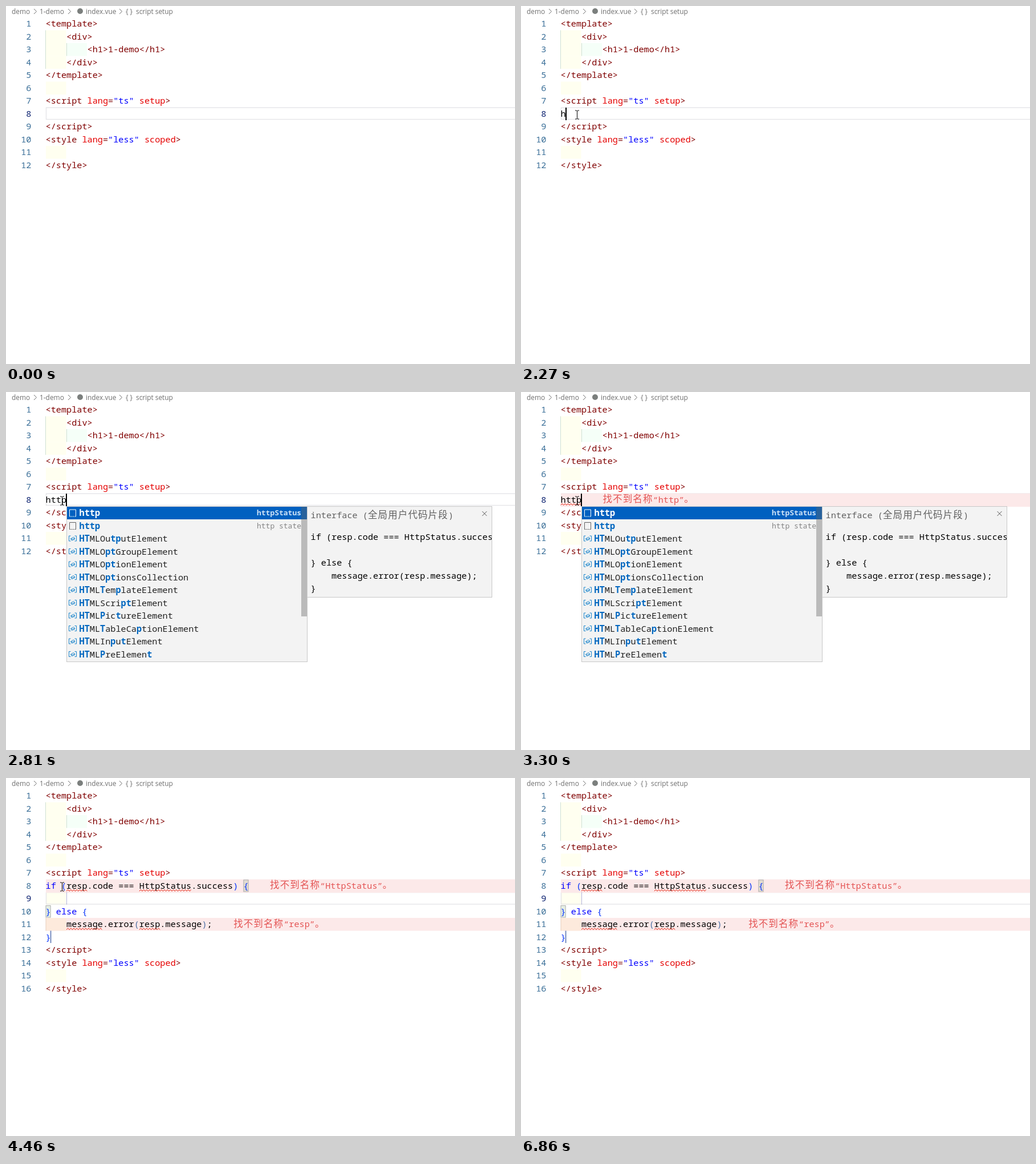
These frames come from a looping animation (893 by 627 pixels, 6.91 s). An HTML page with a canvas:

```html
<!DOCTYPE html>
<html lang="en">
<head>
<meta charset="utf-8">
<title>Snippet completion</title>
<style>
  html, body { margin: 0; width: 100%; height: 100%; overflow: hidden; background: #fff; }
  canvas { display: block; }
</style>
</head>
<body>
<canvas width="893" height="627"></canvas>
<script>
const ctx = document.querySelector('canvas').getContext('2d');
const LOOP = 6910, LEFT = 69.5, CHAR = 9.13, ROW = 22.5, WIDTH = 893;
const MONO = '"Noto Sans Mono", monospace';
const CODE = `15.22px ${MONO}`;
const YELLOW = '#fffff0', PINK = '#fce9e9', GUIDE = '#cfe0d3', TABSTOP = 'rgba(10,50,140,.55)';
const KEYS = [2270, 2410, 2600, 2750];
const LIST_OPEN = 2460, FIRST_ERROR = 3170, INSERT = 3690, COLORED = 4000, ERRORS = 4310;
const GHOST = [4720, 6860];

const MARKUP = /(".*?")|(<\/?\w+|>|=|1-demo)|(\b(?:lang|setup|scoped)\b)/g;
const SCRIPT = /(\b(?:if|else)\b)|([(){}])|([^\s(){}]+)/g;
const above = ['<template>', '    <div>', '        <h1>1-demo</h1>', '    </div>', '</template>', '',
  '<script lang="ts" setup>'];
const below = ['<\/script>', '<style lang="less" scoped>', '', '</style>'];
const snippet = ['if (resp.code === HttpStatus.success) {', '', '} else {', '    message.error(resp.message);', '}'];
// Asterisks switch the bold match highlight on and off.
const lists = {
  2: ['*ht*tp', '*ht*tp', ...['AllCollection', 'AnchorElement', 'AreaElement', 'AudioElement', 'BRElement', 'BaseElement',
    'BodyElement', 'ButtonElement', 'CanvasElement', 'Collection'].map(s => '*HT*ML' + s)],
  4: ['*http*', '*http*', ...['Ou*tp*utElement', 'O*pt*GroupElement', 'O*pt*ionElement', 'O*pt*ionsCollection',
    '*T*em*p*lateElement', 'Scri*pt*Element', '*P*ic*t*ureElement', '*T*ableCa*p*tionElement', 'In*p*u*t*Element',
    '*P*reElemen*t*'].map(s => '*HT*ML' + s)]
};
// Pointer path: time, x, y.
const path = [[90, 752, 574], [270, 420, 260], [400, 110, 37], [500, 58, 90], [630, 95, 181], [820, 95, 181],
  [1130, 98, 191], [1450, 98, 191], [1460, 104, 194], [1540, 98, 190], [5870, 98, 190], [6220, 708, 632]];

const colX = col => LEFT + col * CHAR;

function box(x, y, w, h, color) {
  ctx.fillStyle = color;
  ctx.fillRect(x, y, w, h);
}

function outline(x, y, w, h, color, width = 1) {
  ctx.strokeStyle = color;
  ctx.lineWidth = width;
  ctx.strokeRect(x, y, w, h);
}

function line(points, color, width = 1) {
  ctx.strokeStyle = color;
  ctx.lineWidth = width;
  ctx.beginPath();
  points.forEach(([x, y]) => ctx.lineTo(x, y));
  ctx.stroke();
}

function text(str, x, y, color = '#000', font = CODE, align = 'left') {
  ctx.font = font;
  ctx.fillStyle = color;
  ctx.textAlign = align;
  ctx.fillText(str, x, y);
}

function chinese(str, x, y, color) {
  ctx.letterSpacing = '1.1px';
  text(str, x, y, color, '300 16.5px "Noto Sans CJK SC", "Noto Sans CJK", sans-serif');
  ctx.letterSpacing = '0px';
}

function tokens(str, y, pattern, colors) {
  for (const m of str.matchAll(pattern)) {
    const group = m.slice(1).findIndex(g => g !== undefined);
    text(m[0], colX(m.index), y, colors[group]);
  }
}

function squiggle(col, length, y) {
  const points = [];
  for (let x = 0; x <= length * CHAR; x += 2.6) points.push([colX(col) + x, y + (points.length % 2 ? 18.2 : 20.6)]);
  line(points, '#e51400');
}

function message(col, name, y) {
  const x = colX(col) + 37.5, red = '#e45454';
  chinese('找不到名称', x, y + 15.5, red);
  text(`“${name}”`, x + 88, y + 16, red);
  chinese('。', x + 88 + (name.length + 2) * CHAR, y + 15.5, red);
}

function breadcrumb() {
  const gray = '#6f6f6f', font = '11.9px "Open Sans", sans-serif';
  [['demo', 10], ['1-demo', 59], ['index.vue', 140], ['script setup', 228]].forEach(([s, x]) => text(s, x, 14, gray, font));
  text('{ }', 210, 13.5, gray, font);
  [49, 109, 199].forEach(x => line([[x, 5], [x + 4.5, 9.5], [x, 14]], gray));
  ctx.fillStyle = '#7b7f7d';
  ctx.beginPath();
  ctx.arc(130, 9, 5, 0, 7);
  ctx.fill();
}

function listIcon(x, y, row) {
  if (row < 2) {
    const color = row ? '#616161' : '#fff';
    line([[x + 1, y + 6], [x + 1, y - 6], [x + 12, y - 6], [x + 12, y + 6]], color);
    ctx.setLineDash([2, 1]);
    line([[x + 1, y + 6], [x + 12, y + 6]], color);
    ctx.setLineDash([]);
    return;
  }
  const blue = '#1a85cc';
  line([[x + 3, y - 5], [x, y - 5], [x, y + 4], [x + 3, y + 4]], blue);
  line([[x + 10, y - 5], [x + 13, y - 5], [x + 13, y + 4], [x + 10, y + 4]], blue);
  line([[x + 3, y], [x + 8, y - 3], [x + 10, y - 1], [x + 10, y + 1], [x + 5, y + 3], [x + 3, y], [x + 6, y + 1], [x + 10, y - 1]], blue);
}

function completion(col) {
  const x = Math.round(colX(col)) + .5, y = 200.5;
  box(x, y, 422, 272, '#f3f3f3');
  box(x, y, 422, ROW, '#0060c0');
  lists[col > 2 ? 4 : 2].forEach((item, row) => {
    const middle = 212 + row * ROW;
    listIcon(x + 4, middle, row);
    let tx = x + 22;
    item.split('*').forEach((part, i) => {
      const bold = i % 2, color = !row ? '#fff' : bold ? '#0066bf' : '#222';
      text(part, tx, middle + 5.3, color, (bold ? 'bold ' : '') + CODE);
      tx += part.length * CHAR;
    });
  });
  text('httpStatus', x + 411.5, 216, '#cfe3f7', `bold 13px ${MONO}`, 'right');
  text('http state', x + 411.5, 238.5, '#858585', `13px ${MONO}`, 'right');
  box(x + 411.5, 201, 10, col > 2 ? 192 : 39, 'rgba(100,100,100,.4)');
  outline(x, y, 422, 272, '#c8c8c8');
  details(x + 422, y, col);
}

function details(x, y, col) {
  ctx.save();
  ctx.beginPath();
  ctx.rect(x, y - 1, 325, 161);
  ctx.clip();
  box(x, y, 324, 159, '#f3f3f3');
  text('interface (', x + 6, 220.5, '#616161');
  chinese('全局用户代码片段', x + 106.5, 220.5, '#616161');
  text(')', x + 247.5, 220.5, '#616161');
  snippet.forEach((s, i) => text(s, x + 6, 259.3 + i * ROW));
  if (col === 2) box(x, 349, 280, 10, 'rgba(100,100,100,.13)');
  line([[x + 307, 209], [x + 315, 217]], '#555');
  line([[x + 315, 209], [x + 307, 217]], '#555');
  outline(x, y, 324, 159, '#c8c8c8');
  ctx.restore();
}

function pointer(t) {
  if (t < path[0][0] || t >= path.at(-1)[0]) return;
  const i = path.findIndex(p => p[0] > t);
  const [t0, x0, y0] = path[i - 1], [t1, x1, y1] = path[i];
  const k = (t - t0) / (t1 - t0);
  const x = Math.round(x0 + (x1 - x0) * k) + .5, y = Math.round(y0 + (y1 - y0) * k) + .5;
  line([[x, y - 6.5], [x, y + 6.5]], '#000');
  [-1, 1].forEach(s => line([[x - 3.5, y + s * 7.5], [x - 1, y + s * 7.5], [x, y + s * 6.5],
    [x + 1, y + s * 7.5], [x + 3.5, y + s * 7.5]], '#000'));
}

function draw(t) {
  const typed = KEYS.filter(k => t >= k).length;
  const inserted = t >= INSERT, colored = t >= COLORED, errors = t >= ERRORS;
  const ghost = t >= GHOST[0] && t < GHOST[1];
  const body = inserted ? snippet : ['http'.slice(0, typed)];
  const lines = [...above, ...body, ...below];
  const active = inserted ? 9 : 8;
  const top = n => 20 + ROW * (n - 1 + (ghost && n > 9));
  const indent = (n, color = YELLOW) => box(70, top(n), 35.5, ROW, color);

  box(0, 0, WIDTH, 627, '#fff');
  breadcrumb();

  [2, 3, 4, 6, lines.length - 1].forEach(n => indent(n));
  box(106, top(3), 36, ROW, '#f5fff8');
  box(69, top(2), 1, ROW * 3, GUIDE);
  box(106, top(3), 1, ROW, GUIDE);
  if (colored) box(70, top(9), ghost ? 311 : 35.5, ROW, ghost ? '#fffff7' : YELLOW);
  outline(70.5, top(active) + .5, WIDTH, ROW - 2, '#e5e5e8', 1.4);
  if (t >= FIRST_ERROR) box(70, top(8), WIDTH, ROW + 1, PINK);
  if (errors) {
    box(70, top(11), WIDTH, ROW, PINK);
    indent(11, '#fdeadc');
  } else if (colored) indent(11);
  if (inserted) box(69.5, top(11), 1, ROW, errors ? '#e8cdbb' : '#d3d3d3');
  if (colored) {
    [[38, 8], [0, 10]].forEach(([col, n]) => {
      box(colX(col), top(n) + 1, CHAR, ROW - 2, 'rgba(0,100,0,.1)');
      outline(colX(col) + .5, top(n) + 1, CHAR - 1, ROW - 2, '#b0b0b0');
    });
  }

  lines.forEach((str, i) => {
    const n = i + 1, y = top(n) + 16.2;
    text(n, 44.5, y, n === active ? '#0b216f' : '#3a6f98', CODE, 'right');
    if (i >= 7 && i < 7 + body.length) {
      const bracket = n === 11 ? '#4a6fa5' : '#0431fa';
      tokens(str, y, SCRIPT, colored ? ['#0000ff', bracket, '#000'] : ['#000', '#000', '#000']);
    } else {
      const string = inserted && !colored && n > 12 ? '#0451a5' : '#0000ff';
      tokens(str, y, MARKUP, [string, '#800000', '#e50000']);
    }
  });

  if (errors) {
    squiggle(4, 4, top(8));
    squiggle(18, 10, top(8));
    squiggle(4, 7, top(11));
    squiggle(18, 4, top(11));
    message(39, 'HttpStatus', top(8));
    message(32, 'resp', top(11));
  } else if (t >= FIRST_ERROR) {
    squiggle(0, 4, top(8));
    message(inserted ? 39 : 4, 'http', top(8));
  }
  if (ghost) {
    text('message.success(resp.message);', colX(4), top(9) + 16.2, '#8c8c8c', 'italic ' + CODE);
    text("this.$router.push({ path: '/login' });", colX(4), top(9) + ROW + 16.2, '#8c8c8c', 'italic ' + CODE);
  }
  if (inserted) {
    box(ghost ? 381 : 106, top(9), 1, ROW - 1, 'rgba(10,10,140,.3)');
    box(77.5, top(12), 2, ROW - 1, TABSTOP);
  }

  const blinkOn = inserted ? (t < 4400 || t >= 4900 && t < 5410 || t >= 5910 && t < 6400)
    : typed > 0 || t >= 1460 && t < 1950;
  if (blinkOn) {
    const col = inserted ? 4 : typed;
    box(col ? Math.round(colX(col) - 1) : 70, Math.round(top(active)), col ? 2 : 1, 22, '#000');
  }
  if (t >= LIST_OPEN && !inserted) completion(KEYS.filter(k => t - 50 >= k).length);
  pointer(t);
}

function tick(now) {
  draw(now % LOOP);
  requestAnimationFrame(tick);
}
requestAnimationFrame(tick);
</script>
</body>
</html>
```
